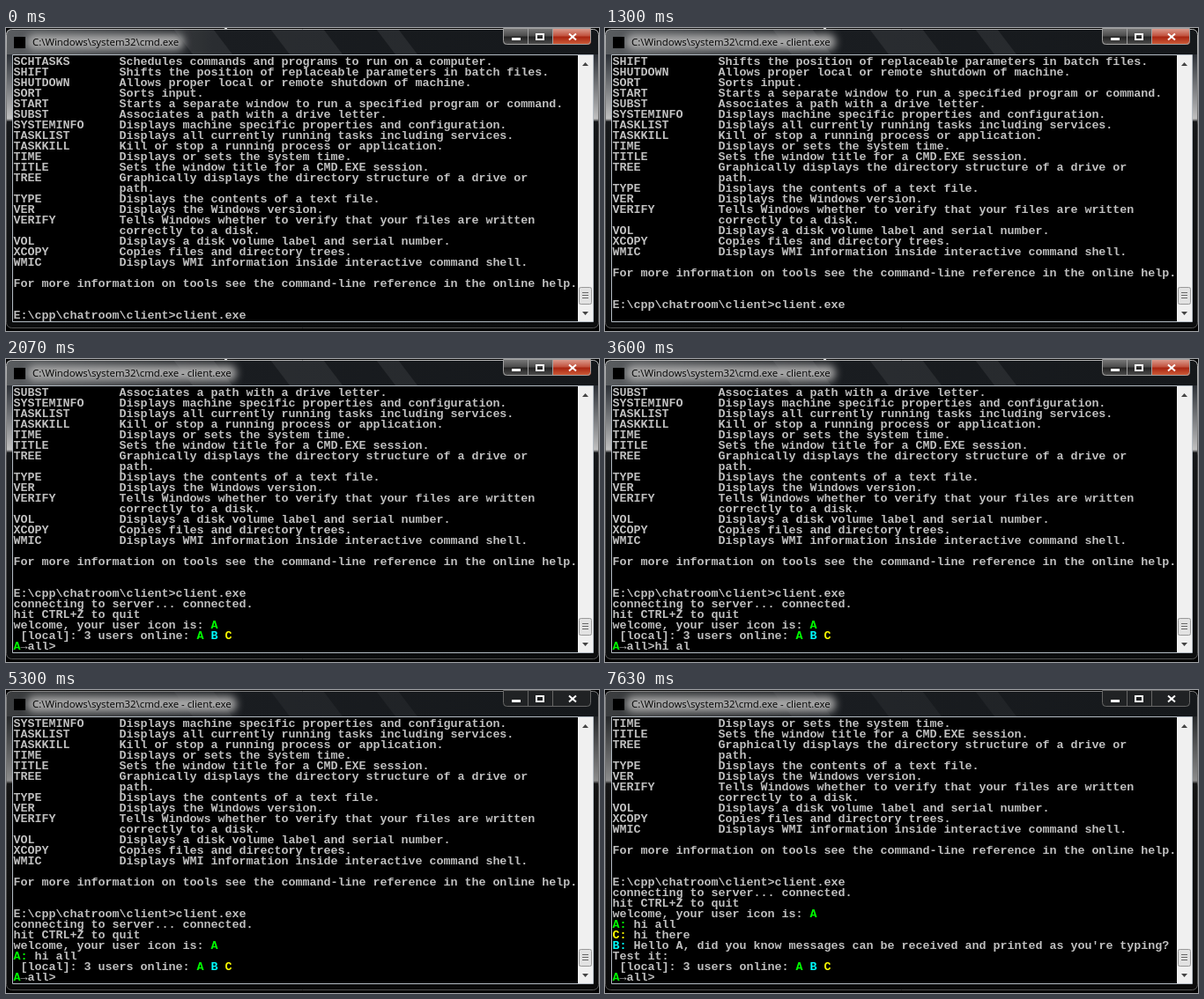
An HTML page with a canvas for the animation above (8 s loop, 673 by 344 pixels).

```html
<!DOCTYPE html>
<html lang="en">
<head>
<meta charset="utf-8">
<title>Console chat</title>
<style>
html, body { margin: 0; width: 100%; height: 100%; overflow: hidden; background: #000; }
canvas { display: block; }
</style>
</head>
<body>
<canvas id="stage" width="673" height="344"></canvas>
<script>
const g = document.getElementById('stage').getContext('2d');
const LOOP = 8000, COL = 8, ROW = 12, LEFT = 9, TOP = 32, ROWS = 25;
const BLUR_AT = 5300;
const colors = { A: '#00ff00', B: '#00ffff', C: '#ffff00' };

const help = `
SCHTASKS|Schedules commands and programs to run on a computer.
SHIFT|Shifts the position of replaceable parameters in batch files.
SHUTDOWN|Allows proper local or remote shutdown of machine.
SORT|Sorts input.
START|Starts a separate window to run a specified program or command.
SUBST|Associates a path with a drive letter.
SYSTEMINFO|Displays machine specific properties and configuration.
TASKLIST|Displays all currently running tasks including services.
TASKKILL|Kill or stop a running process or application.
TIME|Displays or sets the system time.
TITLE|Sets the window title for a CMD.EXE session.
TREE|Graphically displays the directory structure of a drive or
|path.
TYPE|Displays the contents of a text file.
VER|Displays the Windows version.
VERIFY|Tells Windows whether to verify that your files are written
|correctly to a disk.
VOL|Displays a disk volume label and serial number.
XCOPY|Copies files and directory trees.
WMIC|Displays WMI information inside interactive command shell.`.trim().split('\n').map(line => {
  const [name, text] = line.split('|');
  return name.padEnd(15) + text;
});

const shell = [...help, '',
  'For more information on tools see the command-line reference in the online help.',
  '', '', 'E:\\cpp\\chatroom\\client>client.exe'];

// Lines appended to the scrollback; "~" colours the user icon after it.
const output = [
  [1450, 'connecting to server... connected.'],
  [1450, 'hit CTRL+Z to quit'],
  [2070, 'welcome, your user icon is: ~A'],
  [4060, '~A: hi all'],
  [5760, '~C: hi there'],
  [7630, "~B: Hello A, did you know messages can be received and printed as you're typing?"],
  [7630, 'Test it:']
];
const typing = [[2530, 'h'], [2680, 'hi'], [3600, 'hi al'], [3750, 'hi all'], [4060, '']];
const cursors = [[250, 680, 33], [3300, 3450, 8], [4990, 5300, 6]];

function screenAt(t) {
  const lines = [...shell, ...output.filter(o => t >= o[0]).map(o => o[1])];
  if (t >= 2070) {
    const typed = typing.filter(k => t >= k[0]).pop();
    lines.push(' [local]: 3 users online: ~A ~B ~C', '~A→all>' + (typed ? typed[1] : ''));
  } else if (t >= 1300) lines.push('');
  return lines.slice(-ROWS);
}

function rect(color, x, y, w, h) {
  g.fillStyle = color;
  g.fillRect(x, y, w, h);
}

function box(color, x, y, w, h, r = 0) {
  g.strokeStyle = color;
  g.lineWidth = 1;
  g.beginPath();
  g.roundRect(x + .5, y + .5, w - 1, h - 1, r);
  g.stroke();
}

function fade([x0, y0, x1, y1], ...stops) {
  const grad = g.createLinearGradient(x0, y0, x1, y1);
  stops.forEach(([at, color]) => grad.addColorStop(at, color));
  return grad;
}

function triangle(x, y, dir) {
  g.fillStyle = '#444';
  g.beginPath();
  g.moveTo(x - 3.5, y - 2 * dir);
  g.lineTo(x + 3.5, y - 2 * dir);
  g.lineTo(x, y + 2 * dir);
  g.fill();
}

function drawGlass(active) {
  const down = [0, 1, 0, 341];
  g.save();
  g.beginPath();
  g.roundRect(0, 1, 673, 340, 6);
  g.clip();
  rect(active
    ? fade(down, [0, '#1c1f23'], [.09, '#30343a'], [.3, '#c0c0c0'], [.31, '#16181a'], [1, '#0c0d0e'])
    : fade(down, [0, '#181a1c'], [.09, '#282a2c'], [.3, '#8c8c8c'], [.31, '#141414'], [1, '#0a0a0a']),
    0, 1, 673, 340);
  rect(fade([0, 0, 673, 0], [0, active ? '#5a5d60' : '#3c3e40'], [.35, '#1a1d21'], [1, '#15181b']), 1, 2, 671, 28);

  // Slanted reflections across the title bar.
  g.fillStyle = active ? 'rgba(255,255,255,.07)' : 'rgba(255,255,255,.04)';
  for (const [x, w] of [[190, 45], [300, 60], [420, 25]]) {
    g.beginPath();
    g.moveTo(x, 1);
    g.lineTo(x + w, 1);
    g.lineTo(x + w + 22, 30);
    g.lineTo(x + 22, 30);
    g.fill();
  }
  g.restore();
  box(fade(down, [0, active ? '#b8b8b8' : '#808080'], [.3, '#707070'], [.32, '#444'], [1, '#555']), 0, 1, 673, 340, 6);
}

function drawTitle(text) {
  g.font = '11.4px "Open Sans", sans-serif';
  g.save();
  g.filter = 'blur(5px)';
  g.fillStyle = '#a8a8a8';
  g.beginPath();
  g.roundRect(24, 7, g.measureText(text).width + 12, 18, 8);
  g.fill();
  g.restore();
  g.fillStyle = '#000';
  g.fillText(text, 30, 20);
}

function drawButtons(active) {
  const down = [0, 1, 0, 19];
  g.save();
  g.beginPath();
  g.roundRect(564, 1, 100, 18, [0, 0, 4, 4]);
  g.clip();
  rect(active ? fade(down, [0, '#777'], [.45, '#4a4a4a'], [.5, '#222'], [1, '#505050']) : '#202224', 564, 1, 64, 18);
  rect(active ? fade(down, [0, '#dc9a8c'], [.45, '#c0503c'], [.5, '#a82410'], [1, '#d0603c']) : '#202224', 620, 1, 44, 18);
  g.restore();

  const line = active ? '#a0a0a0' : '#666';
  box(line, 564, 0, 100, 19, [0, 0, 4, 4]);
  rect(line, 592, 1, 1, 17);
  rect(line, 620, 1, 1, 17);

  rect('#fff', 574, 11, 10, 3);
  g.strokeStyle = '#fff';
  g.lineWidth = 2;
  g.strokeRect(602, 7, 8, 6);
  g.beginPath();
  g.moveTo(639, 6.5); g.lineTo(647, 13.5);
  g.moveTo(647, 6.5); g.lineTo(639, 13.5);
  g.stroke();
}

function drawWindow(t) {
  const active = t < BLUR_AT;
  rect('#000', 0, 0, 673, 344);
  if (t < 4680) rect('#ddd', 248, 0, 3, 1);
  drawGlass(active);
  drawTitle('C:\\Windows\\system32\\cmd.exe' + (t >= 1300 ? ' - client.exe' : ''));
  rect('#000', 9, 10, 13, 13);
  drawButtons(active);
  box('#b4bcc4', 7, 30, 660, 304);
  rect('#000', 8, 31, 641, 302);
}

function drawScrollbar() {
  rect('#f0f0f0', 649, 31, 17, 302);
  triangle(657.5, 41, -1);
  triangle(657.5, 324, 1);
  rect('#e2e2e2', 650, 294, 15, 20);
  box('#989898', 650, 294, 15, 20, 2);
  for (let y = 300; y < 308; y += 3) rect('#666', 654, y, 7, 1);
}

function drawText(t) {
  g.font = 'bold 13.33px "Liberation Mono", monospace';
  screenAt(t).forEach((line, row) => {
    let x = LEFT - .5;
    for (let part of line.split(/(~[ABC]:?)/)) {
      const icon = part[0] === '~';
      if (icon) part = part.slice(1);
      g.fillStyle = icon ? colors[part[0]] : '#c0c0c0';
      g.fillText(part, x, TOP + row * ROW + 10);
      x += part.length * COL;
    }
  });
  const cursor = cursors.find(([on, off]) => t >= on && t < off);
  if (cursor) rect('#c0c0c0', LEFT + cursor[2] * COL, 329, COL, 3);
}

function frame() {
  const t = performance.now() % LOOP;
  drawWindow(t);
  drawScrollbar();
  drawText(t);
  requestAnimationFrame(frame);
}
frame();
</script>
</body>
</html>
```
